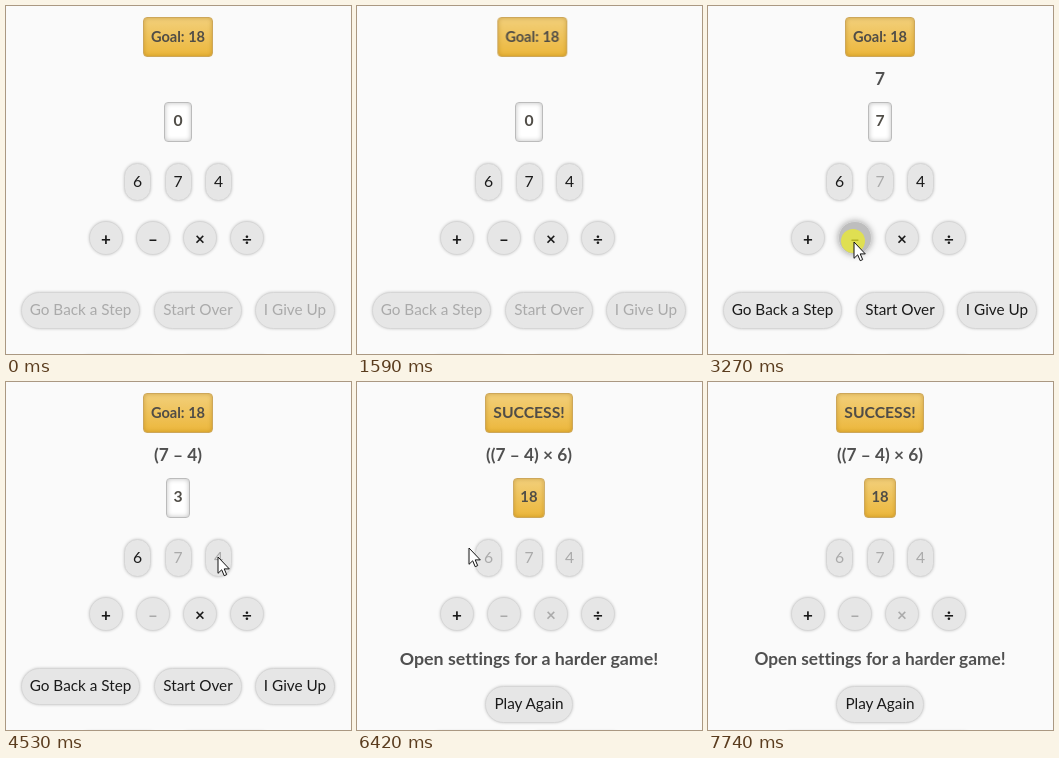
These frames come from a looping animation (345 by 348 pixels, 8.47 s). An HTML page:

```html
<!DOCTYPE html>
<html lang="en">
<head>
<meta charset="utf-8">
<title>Number game</title>
<style>
  :root { --loop: 8.47s infinite; --face: #e6e6e6; --dim: #aaa; --soft: 0 0 3px rgba(0, 0, 0, .2); }
  html, body { margin: 0; width: 100%; height: 100%; overflow: hidden; background: #fafafa; }
  body {
    position: relative; color: #1a1a1a;
    font: 15.3px Lato, "Open Sans", sans-serif; font-variant-ligatures: none;
  }
  body * { position: absolute; box-sizing: border-box; }

  .key, .box, .line { display: flex; align-items: center; justify-content: center; white-space: pre; }
  .key { background: var(--face); border: 1px solid #d6d6d6; border-radius: 19px; box-shadow: var(--soft); }
  .num { top: 157px; width: 27px; height: 38px; padding-bottom: 2px; font-size: 15.7px; }
  .op { top: 215px; width: 34px; height: 34px; font-weight: 700; font-size: 17px; }
  .cmd { top: 286px; height: 37px; padding-bottom: 3px; }

  .box { height: 40px; padding-bottom: 2px; border-radius: 4px; font-weight: 700; color: #504d47; }
  .gold {
    top: 11px; background: linear-gradient(#f2cf7a, #ecb73c); border: 1px solid #cda75a;
    box-shadow: inset 0 0 4px rgba(150, 100, 0, .4);
  }
  .val { top: 96px; padding-bottom: 4px; font-size: 15.7px; }
  .white { background: #fff; border: 1px solid #bbb; box-shadow: inset 0 0 5px rgba(0, 0, 0, .25); }
  .line { left: 0; width: 344px; height: 24px; font-weight: 700; font-size: 17.3px; color: #505050; }
  .sum { top: 60px; }

  /* parts that exist only during some moves of the game */
  .show { visibility: hidden; animation: var(--on) var(--loop) step-end; }
  .start { --on: start }   @keyframes start { 0% { visibility: visible } 29.28% { visibility: hidden } }
  .play { --on: play }     @keyframes play { 0% { visibility: visible } 75.8% { visibility: hidden } }
  .first { --on: first }   @keyframes first { 29.28% { visibility: visible } 40.14% { visibility: hidden } }
  .seven { --on: seven }   @keyframes seven { 29.28% { visibility: visible } 53.48% { visibility: hidden } }
  .minus { --on: minus }   @keyframes minus { 40.14% { visibility: visible } 53.48% { visibility: hidden } }
  .diff { --on: diff }     @keyframes diff { 53.48% { visibility: visible } 64.58% { visibility: hidden } }
  .three { --on: three }   @keyframes three { 53.48% { visibility: visible } 75.8% { visibility: hidden } }
  .times { --on: times }   @keyframes times { 64.58% { visibility: visible } 75.8% { visibility: hidden } }
  .won { --on: won }       @keyframes won { 75.8%, 100% { visibility: visible } }

  /* keys: pressed, then used up */
  .use { --down: 0 0 6px #a5a5a5; animation: var(--use) var(--loop) step-end; }
  @keyframes use7 {
    27.74% { background: #bebebe; box-shadow: var(--down) }
    29.28%, 100% { background: var(--face); box-shadow: var(--soft); color: var(--dim) }
  }
  @keyframes useMinus {
    38.61% { background: #bebebe; box-shadow: var(--down) }
    40.14%, 100% { background: var(--face); box-shadow: var(--soft); color: var(--dim) }
  }
  @keyframes use4 {
    51.95% { background: #bebebe; box-shadow: var(--down) }
    53.48%, 100% { background: var(--face); box-shadow: var(--soft); color: var(--dim) }
  }
  @keyframes useTimes {
    63.05% { background: #bebebe; box-shadow: var(--down) }
    64.58%, 100% { background: var(--face); box-shadow: var(--soft); color: var(--dim) }
  }
  @keyframes use6 {
    74.26% { background: #bebebe; box-shadow: var(--down) }
    75.8%, 100% { background: var(--face); box-shadow: var(--soft); color: var(--dim) }
  }
  .cmd.play { color: var(--dim); animation: play var(--loop) step-end, enable var(--loop) step-end; }
  @keyframes enable { 29.28%, 100% { color: #1a1a1a } }

  .goal { animation: play var(--loop) step-end, shakeGoal var(--loop) cubic-bezier(.36, .07, .19, .97); }
  @keyframes shakeGoal {
    0%, 12.1%, 23.91%, 100% { transform: none }
    13.28%, 22.73% { transform: translateX(-1px) }
    14.46%, 21.55% { transform: translateX(2px) }
    15.64%, 18%, 20.37% { transform: translateX(-4px) }
    16.82%, 19.19% { transform: translateX(4px) }
  }
  .answer { animation: won var(--loop) step-end, shakeAnswer var(--loop) cubic-bezier(.36, .07, .19, .97); }
  @keyframes shakeAnswer {
    0%, 75.68%, 87.49%, 100% { transform: none }
    76.86%, 86.3% { transform: translateX(-1px) }
    78.04%, 85.12% { transform: translateX(2px) }
    79.22%, 81.58%, 83.94% { transform: translateX(-4px) }
    80.4%, 82.76% { transform: translateX(4px) }
  }
  .hint { top: 264px; animation: won var(--loop) step-end, pulse var(--loop) ease; }
  @keyframes pulse {
    0%, 73.79%, 85.6%, 100% { transform: none }
    79.69% { transform: scale(1.05) }
  }

  .cursor { left: 0; top: 0; width: 0; height: 0; animation: move var(--loop) ease-in-out; }
  .cursor svg { left: -.5px; top: -.5px; }
  .dot {
    left: -12px; top: -12px; width: 24px; height: 24px; border-radius: 50%;
    background: rgba(235, 236, 40, .72); visibility: hidden;
    animation: click var(--loop) step-end;
  }
  @keyframes click {
    27.74%, 38.61%, 51.95%, 63.05%, 74.26% { visibility: visible }
    29.28%, 40.14%, 53.48%, 64.58%, 75.8% { visibility: hidden }
  }
  @keyframes move {
    0%, 19.95% { transform: translate(346px, 110px); animation-timing-function: linear }
    22.08% { transform: translate(220px, 168px); animation-timing-function: ease-out }
    26.09%, 30.3% { transform: translate(170px, 176px) }
    35.89%, 40.3% { transform: translate(145px, 235px) }
    48.05% { transform: translate(212px, 175px) }
    49.59%, 53.6% { transform: translate(211px, 174px) }
    60.68%, 64.7% { transform: translate(193px, 233px) }
    72.73%, 74.4% { transform: translate(133px, 176px) }
    75.8% { transform: translate(111px, 165px); animation-timing-function: linear }
    84.06% { transform: translate(64px, 148px); animation-timing-function: linear }
    90.9%, 100% { transform: translate(8px, 350px) }
  }
</style>
</head>
<body>
  <div class="box gold show goal" style="left:137px;width:70px;font-size:14.6px">Goal: 18</div>
  <div class="box gold show won" style="left:128px;width:88px;font-size:15.7px">SUCCESS!</div>

  <div class="line sum show first">7</div>
  <div class="line sum show minus">7 –</div>
  <div class="line sum show diff">(7 – 4)</div>
  <div class="line sum show times">(7 – 4) ×</div>
  <div class="line sum show won">((7 – 4) × 6)</div>

  <div class="box val white show start" style="left:158px;width:28px">0</div>
  <div class="box val white show seven" style="left:160px;width:24px">7</div>
  <div class="box val white show three" style="left:160px;width:24px">3</div>
  <div class="box gold val show answer" style="left:156px;width:32px;font-size:14.8px">18</div>

  <div class="key num use" style="left:118px;--use:use6">6</div>
  <div class="key num use" style="left:158.5px;--use:use7">7</div>
  <div class="key num use" style="left:199px;--use:use4">4</div>

  <div class="key op" style="left:83px">+</div>
  <div class="key op use" style="left:130px;--use:useMinus">–</div>
  <div class="key op use" style="left:177px;--use:useTimes">×</div>
  <div class="key op" style="left:224px">÷</div>

  <div class="key cmd show play" style="left:15px;width:119px">Go Back a Step</div>
  <div class="key cmd show play" style="left:148px;width:88px">Start Over</div>
  <div class="key cmd show play" style="left:249px;width:80px">I Give Up</div>

  <div class="line show hint">Open settings for a harder game!</div>
  <div class="key cmd show won" style="left:128px;width:88px;top:304px">Play Again</div>

  <div class="key" style="left:66px;width:94px;top:349px;height:37px"></div>
  <div class="key" style="left:166px;width:106px;top:349px;height:37px"></div>

  <div class="cursor">
    <div class="dot"></div>
    <svg width="14" height="21" viewBox="-.5 -.5 14 21">
      <path d="M.5 .5V16.8L4.2 13.3L6.7 19.2L9.2 18.1L6.7 12.4H11.8Z" fill="#fff" stroke="#111" stroke-linejoin="round"/>
    </svg>
  </div>
</body>
</html>
```
